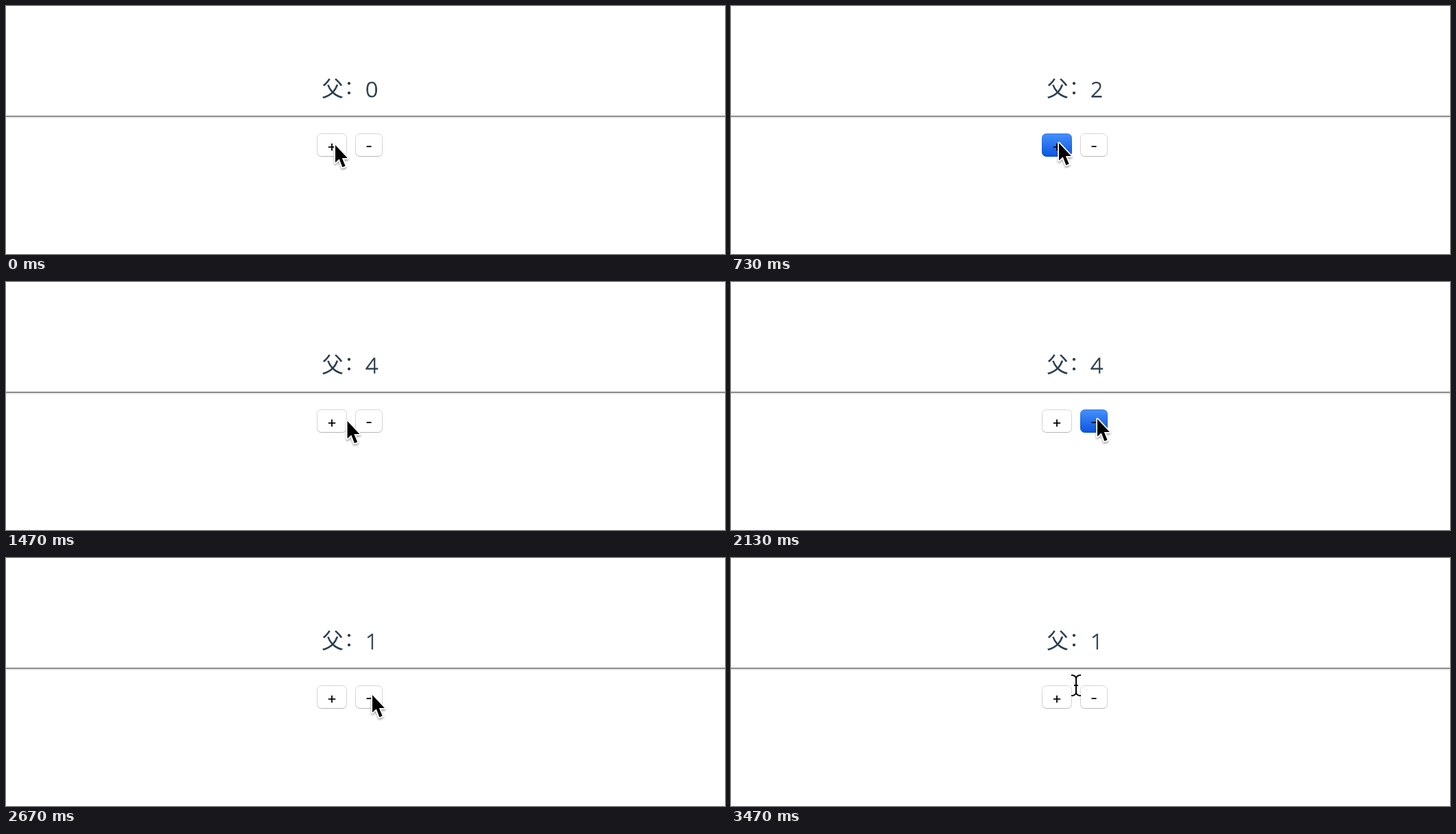
Write an HTML page that moves like this. It is 1048 px wide and 362 px high and loops after 3.54 s.

```html
<!DOCTYPE html>
<html lang="zh-CN">
<head>
<meta charset="utf-8">
<title>Counter</title>
<style>
  html, body { margin: 0; width: 100%; height: 100%; overflow: hidden; background: #fff; }
  svg { display: block; width: 1048px; height: 362px; }
  .label { font: 300 32px "Noto Sans CJK SC", "Noto Sans CJK", sans-serif; fill: #2c3e50; }
  .colon { font-size: 28px; }
  .digit { font: 300 32px "Open Sans", "Noto Sans", sans-serif; fill: #2c3e50; stroke: #2c3e50; stroke-width: .8px; }
  .sign { font: 400 22px Inter, sans-serif; text-anchor: middle; }
</style>
</head>
<body>
<svg viewBox="0 0 1048 362">
  <defs>
    <linearGradient id="blue" x1="0" y1="0" x2="0" y2="1">
      <stop offset="0" stop-color="#4690fb"/>
      <stop offset="1" stop-color="#0a56e0"/>
    </linearGradient>
    <linearGradient id="rim" x1="0" y1="0" x2="0" y2="1">
      <stop offset="0" stop-color="#d6d6d6"/>
      <stop offset=".8" stop-color="#d2d2d2"/>
      <stop offset="1" stop-color="#b4b4b4"/>
    </linearGradient>
    <linearGradient id="blueRim" x1="0" y1="0" x2="0" y2="1">
      <stop offset="0" stop-color="#3a80f2"/>
      <stop offset="1" stop-color="#0a4cce"/>
    </linearGradient>
    <filter id="shadow" x="-50%" y="-50%" width="200%" height="200%">
      <feDropShadow dx="0" dy="2" stdDeviation="1.8" flood-opacity=".4"/>
    </filter>
    <path id="caret" d="M-7 -15Q0 -15 0 -9.5Q0 -15 7 -15M0 -10V10M-7 15Q0 15 0 9.5Q0 15 7 15M-3 0H3"/>
  </defs>

  <text class="label" x="460" y="131.5">父</text>
  <text class="label colon" x="493" y="129">：</text>
  <text class="digit" id="count" x="524" y="133">0</text>
  <rect y="160" width="1048" height="2" fill="#8b8b8b"/>
  <rect y="162" width="1048" height="2" fill="#ececec"/>

  <rect id="plus" x="453.5" y="186.5" width="43" height="33" rx="6"/>
  <text class="sign" x="475" y="211.5">+</text>
  <rect id="minus" x="509.5" y="186.5" width="39" height="33" rx="6"/>
  <text class="sign" x="529" y="212">-</text>

  <g id="arrow" filter="url(#shadow)">
    <path d="M0 0V25.5L5.7 20.3L10.4 32.3L14.6 30.5L9.8 19H17.8Z"
      stroke="#fff" stroke-width="3.4" stroke-linejoin="round" paint-order="stroke"/>
  </g>
  <g id="beam" fill="none">
    <use href="#caret" stroke="#fff" stroke-width="4"/>
    <use href="#caret" stroke="#000" stroke-width="2"/>
  </g>
</svg>
<script>
const LOOP = 3540;
const TICK = 200 / 3;
const BEAM_START = 3470;
const $ = id => document.getElementById(id);

// A click counts shortly after the press, then the button is let go.
const COUNT_DELAY = 65, HOLD = 115;
const clicks = {
  plus: { first: 475, gap: 190, times: 4, step: 1 },
  minus: { first: 2125, gap: 200, times: 3, step: -1 }
};

// Each move eases to its target, swinging out by "swing" halfway.
const start = [480, 203];
const moves = [
  { from: 0, to: 270, target: [478, 200], swing: [162, 58], power: 1 },
  { from: 1400, to: 1730, target: [534, 200], swing: [0, 3.3], power: 1.8 },
  { from: 2930, to: BEAM_START, target: [503, 186], swing: [153, -6], power: 1 }
];

const clamp = u => Math.min(1, Math.max(0, u));

function pressTimes({ first, gap, times }) {
  return Array.from({ length: times }, (_, i) => first + i * gap);
}

function countAt(t) {
  return Object.values(clicks).reduce((sum, c) =>
    sum + c.step * pressTimes(c).filter(p => t >= p + COUNT_DELAY).length, 0);
}

function pointerAt(t) {
  return moves.reduce((pos, m) => {
    const u = 1 - (1 - clamp((t - m.from) / (m.to - m.from))) ** m.power;
    const arc = Math.sin(Math.PI * u);
    return pos.map((p, i) => p + (m.target[i] - p) * u + m.swing[i] * arc);
  }, start);
}

// The picture holds still within a tick; ticks fall on hundredths of a second.
function snap(t) {
  return Math.round(Math.floor((t + 4) / TICK) * TICK / 10) * 10;
}

function paintButton(id, t) {
  const down = pressTimes(clicks[id]).some(p => t >= p && t < p + HOLD);
  $(id).setAttribute("fill", down ? "url(#blue)" : "#fff");
  $(id).setAttribute("stroke", down ? "url(#blueRim)" : "url(#rim)");
}

function draw(ms) {
  const t = snap(ms % LOOP);
  $("count").textContent = countAt(t);
  Object.keys(clicks).forEach(id => paintButton(id, t));

  const [x, y] = pointerAt(t);
  const shown = t >= BEAM_START ? "beam" : "arrow";
  for (const id of ["arrow", "beam"]) {
    $(id).setAttribute("transform", `translate(${x} ${y})`);
    $(id).style.display = id === shown ? "" : "none";
  }
}

function frame() {
  draw(performance.now());
  requestAnimationFrame(frame);
}
frame();
</script>
</body>
</html>
```
